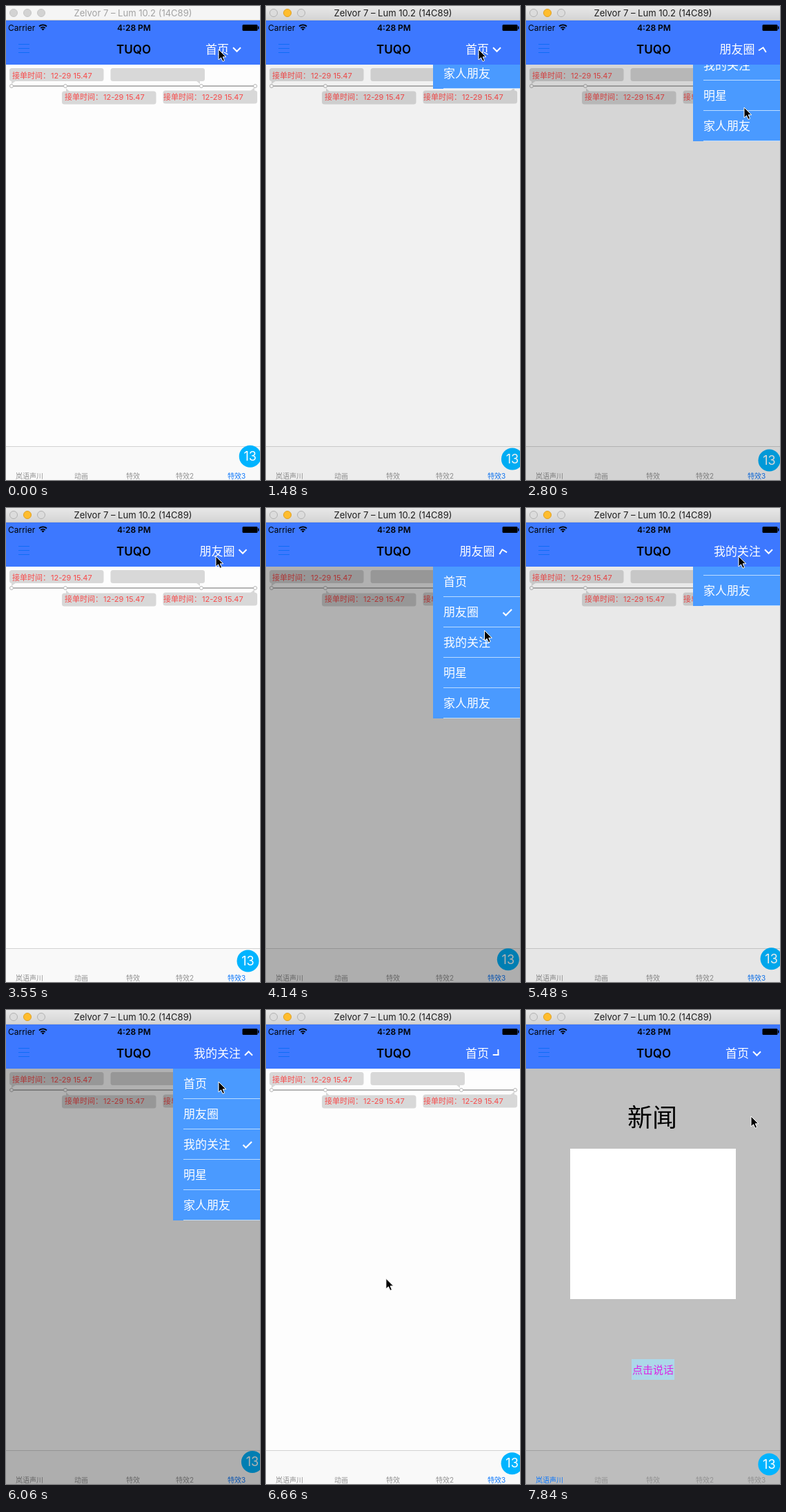
Write an HTML page that moves like this. It is 368 px wide and 687 px high and loops after 7.99 s.

```html
<!DOCTYPE html>
<html lang="zh">
<head>
<meta charset="utf-8">
<style>
  html, body { margin: 0; width: 100%; height: 100%; overflow: hidden; background: #fdfdfd; }
  svg { display: block; width: 368px; height: 687px; }
  text { font-family: Inter, "Noto Sans CJK SC", sans-serif; white-space: pre; }
  .mid { text-anchor: middle; }
  .nav { font-size: 17px; fill: #fff; }
  .tab { font-size: 10px; text-anchor: middle; fill: #929292; }
  .tab.on { fill: #0f78fa; }
  .note { font-size: 11px; fill: #f84a4a; }
</style>
</head>
<body>
<svg id="stage" viewBox="0 0 368 687"></svg>
<script>
const LOOP = 7990, STEP = LOOP / 54, ROW = 44;
const SLIDE = 3 * STEP, ARROW_DELAY = STEP;
const ITEMS = ['首页', '朋友圈', '我的关注', '明星', '家人朋友'];
const TABS = ['岚语声川', '动画', '特效', '特效2', '特效3'];

// The menu opens and closes three times; each closing picks an item.
const VISITS = [
  { open: 1367, close: 2591, pick: 1 },
  { open: 3625, close: 4291, pick: 2 },
  { open: 5327, close: 6214, pick: 0 },
];
const ACTIVATE = 1330, SWITCH_TAB = 7390;
// Pointer stops: time, x, y.
const STOPS = [[1800, 308, 63], [2811, 316, 147], [3551, 304, 70], [4291, 318, 190], [4735, 321, 117],
  [5327, 308, 66], [6066, 308, 104], [7250, 40, 674], [7842, 326, 154]];

const ease = p => { p = Math.min(1, Math.max(0, p)); return p * p * (3 - 2 * p); };
const slide = (time, from) => ease((time - from) / SLIDE);

function pointerAt(time) {
  let [, x, y] = STOPS[0];
  for (let i = 1; i < STOPS.length; i++) {
    const [from] = STOPS[i - 1], [to, nextX, nextY] = STOPS[i];
    const k = ease((time - from) / (to - from));
    x += (nextX - x) * k;
    y += (nextY - y) * k;
  }
  return [x, y];
}

const rect = (x, y, w, h, fill, more = '') =>
  `<rect x="${x}" y="${y}" width="${w}" height="${h}" fill="${fill}" ${more}/>`;
const text = (x, y, s, more = '') => `<text x="${x}" y="${y}" ${more}>${s}</text>`;
const line = (d, color, width = 1, more = '') =>
  `<path d="${d}" fill="none" stroke="${color}" stroke-width="${width}" ${more}/>`;

const bubble = (x, y, tail) => rect(x, y, 136.5, 19, '#d8d8d8', 'rx="3.5"') + `<path d="${tail}z" fill="#d8d8d8"/>`;
const note = (x, y) => text(x, y, '接单时间：', 'class="note"') + text(x + 56, y, '12-29 15.47', 'class="note"');

const timeline = `<g id="timeline">
  ${line('M8 116H361', '#b4b4b4', 2)}
  ${bubble(5, 90, 'M8 108H15L8 113')}${bubble(151.5, 90, 'M275 108H281V113')}
  ${bubble(81, 123.5, 'M87 119L93 125H87')}${bubble(227.5, 122.5, 'M360 118L353 124H360')}
  ${[8, 86, 283, 361].map(x => `<circle cx="${x}" cy="116" r="2.5" fill="#fff" stroke="#b4b4b4"/>`).join('')}
  ${note(9, 104.5)}${note(85, 136)}${note(228, 135.5)}
</g>`;

const news = `<g id="news">
  ${rect(0, 85, 368, 602, '#c0c0c0')}
  ${text(183, 168.5, '新闻', 'class="mid" font-size="36"')}
  ${rect(64, 201, 240, 218, '#fff')}
  ${rect(153, 506, 62, 30, '#add8e9')}
  ${text(184, 526.5, '点击说话', 'class="mid" font-size="15" fill="#dc24e4"')}
</g>`;

const tabBar = rect(0, 639, 368, 48, '#000', 'opacity=".015"') +
  line('M0 638.5H368', '#000', 1, 'opacity=".17"') +
  TABS.map((s, i) => text(34 + 75 * i, 684.5, s, 'class="tab"')).join('');

const menu = `<g clip-path="url(#below)"><g id="menu">
  ${rect(242, 85, 126, 5 * ROW, '#4a9aff')}
  ${ITEMS.map((s, i) => text(257, 113 + ROW * i, s, 'class="nav"') +
    line(`M257 ${128.5 + ROW * i}H368`, '#bcdcff')).join('')}
  ${line('M343.5 107.5l4 4 8.5 -8.5', '#fff', 2.2, 'id="check"')}
</g></g>`;

const header = `${rect(0, 0, 368, 21, 'url(#chrome)')}${rect(0, 0, 368, 21, '#f5f5f5', 'id="idle"')}
  ${line('M0 20.5H368', '#c4c4c4')}
  ${[11, 31, 51].map(x => `<circle class="light" cx="${x}" cy="10" r="5.5"/>`).join('')}
  ${text(184, 15, 'Zelvor 7 – Lum 10.2 (14C89)', 'class="mid" id="title" font-size="13"')}
  ${rect(0, 21, 368, 64, '#3d78ff')}
  ${text(3, 35.5, 'Carrier', 'font-size="12"')}
  ${line('M48 29.5a8 8 0 0 1 11 0M50.3 32a5 5 0 0 1 6.4 0', '#000', 1.8)}
  <path d="M51.5 33.5a3 3 0 0 1 4 0l-2 2z"/>
  ${text(185.5, 35.5, '4:28 PM', 'class="mid" font-size="12" font-weight="600"')}
  ${rect(342.5, 27, 22, 9, '#000', 'rx="1.5"')}${rect(365, 29.5, 1.5, 4, '#000')}
  ${line('M18 55.5H34M18 61.5H34M18 67.5H34', '#0f6cf6')}
  ${text(185, 69, 'TUQO', 'class="mid" font-size="17" font-weight="600"')}
  ${text(0, 69, '', 'class="nav" id="pick"')}
  ${line('M-5.5 -2.8L0 2.8L5.5 -2.8', '#fff', 2, 'id="arrow"')}`;

const stage = document.getElementById('stage');
stage.innerHTML = `<defs>
    <linearGradient id="chrome" x2="0" y2="1"><stop stop-color="#e8e8e8"/><stop offset="1" stop-color="#d3d3d3"/></linearGradient>
    <clipPath id="below"><rect y="85" width="368" height="602"/></clipPath>
  </defs>
  ${rect(0, 0, 368, 687, '#fdfdfd')}${timeline}${news}${tabBar}
  <g id="badge"><circle r="16" fill="#00b4ff"/>${text(0, 6.3, '13', 'class="mid" font-size="18" fill="#fff"')}</g>
  ${rect(0, 85, 368, 602, '#000', 'id="shade"')}
  ${menu}${header}
  <path id="pointer" d="M0 0V15L3.5 11.8L6 17.3L8.6 16.2L6.2 10.8H10.8Z" stroke="#fff"/>`;

const el = id => document.getElementById(id);
const set = (node, attrs) => { for (const k in attrs) node.setAttribute(k, attrs[k]); };
const show = (id, on) => { el(id).style.display = on ? '' : 'none'; };
const tabs = [...stage.querySelectorAll('.tab')];
const lights = [...stage.querySelectorAll('.light')];

function draw(time) {
  let open = 0, turn = 0, pick = 0;
  for (const visit of VISITS) {
    open += slide(time, visit.open) - slide(time, visit.close);
    turn += 180 * (slide(time, visit.open + ARROW_DELAY) + slide(time, visit.close + ARROW_DELAY));
    if (time >= visit.close) pick = visit.pick;
  }
  const active = time >= ACTIVATE, onNews = time >= SWITCH_TAB;

  show('idle', !active);
  set(el('title'), { fill: active ? '#1c1c1c' : '#a2a2a2' });
  lights.forEach((light, i) => set(light, active && i === 1
    ? { fill: '#ffbd2e', stroke: '#dfa023' }
    : { fill: active ? '#dcdcdc' : '#d3d3d3', stroke: active ? '#b2b2b2' : '#c6c6c6' }));

  const width = 17 * ITEMS[pick].length;
  el('pick').textContent = ITEMS[pick];
  set(el('pick'), { x: 306 - width / 2 });
  set(el('arrow'), { transform: `translate(${317.5 + width / 2} 63) rotate(${turn})` });

  show('menu', open > .001);
  set(el('menu'), { transform: `translate(0 ${Math.round(5 * ROW * (open - 1))})` });
  set(el('check'), { transform: `translate(0 ${ROW * pick})` });
  set(el('shade'), { opacity: .3 * open });

  show('timeline', !onNews);
  show('news', onNews);
  tabs.forEach((tab, i) => tab.classList.toggle('on', i === (onNews ? 0 : 4)));

  // The badge drifts around a small circle once every five seconds.
  const angle = time / 5000 * 2 * Math.PI - Math.PI / 2;
  set(el('badge'), { transform: `translate(${353.7 + 3.3 * Math.cos(angle)} ${655.7 + 3 * Math.sin(angle)})` });
  set(el('pointer'), { transform: `translate(${pointerAt(time)})` });
}

const start = performance.now();
function tick() {
  const time = (performance.now() - start) % LOOP;
  // The picture only changes once per step; the margin absorbs timer jitter.
  draw(Math.min(53, Math.floor((time + 20) / STEP)) * STEP);
  requestAnimationFrame(tick);
}
tick();
</script>
</body>
</html>
```
